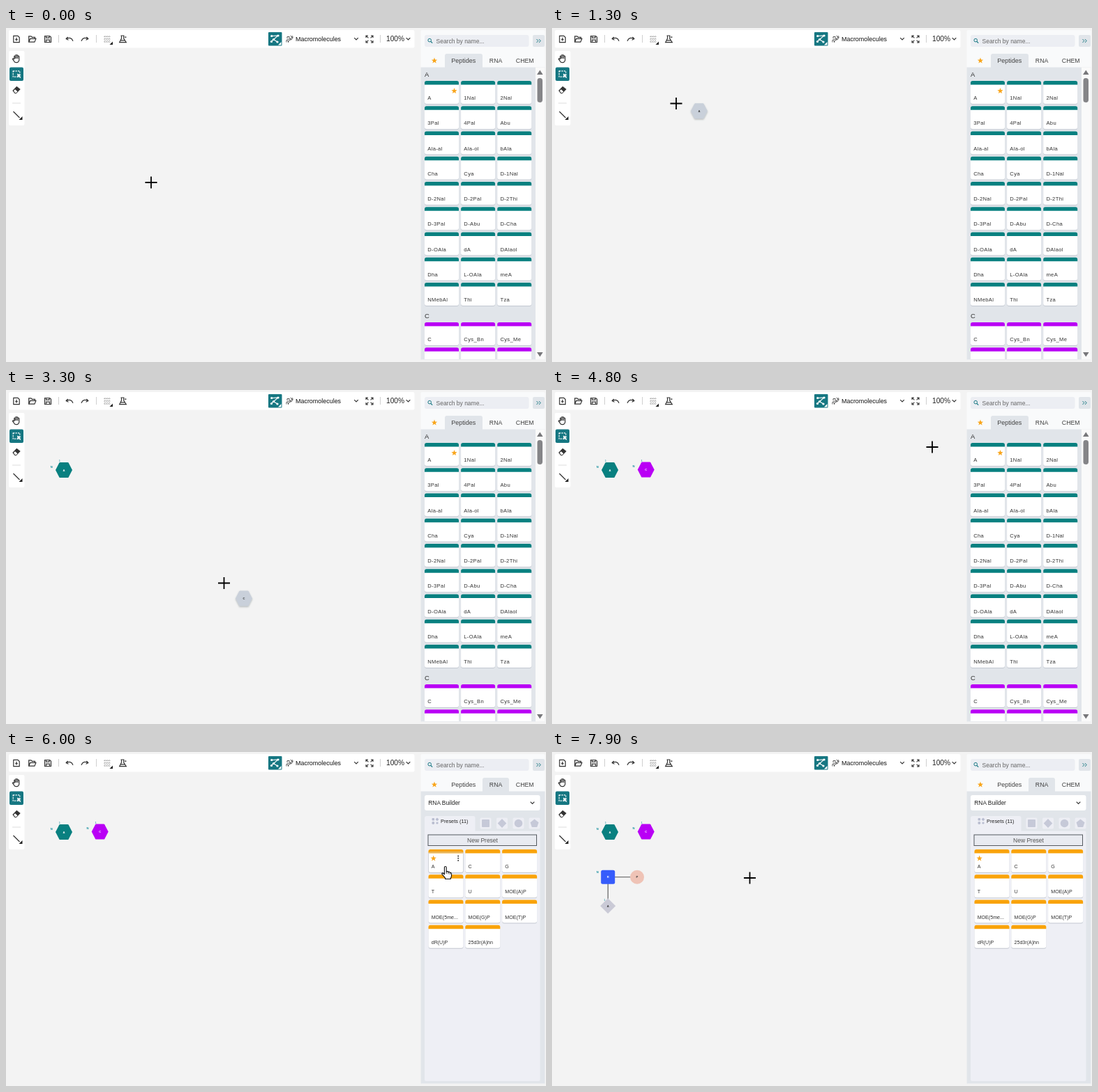
An HTML page that plays this animation: 774x480 px, repeating every 8 s.

```html
<!DOCTYPE html>
<html lang="en">
<head>
<meta charset="utf-8">
<title>Monomer editor</title>
<style>
html, body { margin: 0; width: 100%; height: 100%; overflow: hidden; background: #f3f3f3; }
svg { display: block; width: 774px; height: 480px; font-family: "Liberation Sans", Arial, sans-serif; }
.ico { fill: none; stroke: #333; stroke-width: 1.2; }
</style>
</head>
<body>
<svg id="stage" viewBox="0 0 774 480"></svg>
<script>
const LOOP = 8000, STEP = 100, LAG = 25;
const TEAL = '#167782', MARK = '#0b8b9a', GHOST = '#c9d0da', PANEL = '#e1e5ea';
const AMINO = '#088080', CYS = '#b900f5', PRESET = '#f9a30a';

const rect = (x, y, w, h, fill, r = 0, more = '') =>
  `<rect x="${x}" y="${y}" width="${w}" height="${h}" rx="${r}" fill="${fill}" ${more}/>`;
const text = (x, y, s, size = 8.8, fill = '#333', more = '') =>
  `<text x="${x}" y="${y}" font-size="${size}" fill="${fill}" ${more}>${s}</text>`;
const path = (d, more = '') => `<path d="${d}" ${more}/>`;
const icon = (x, y, d, more = '') => `<path class="ico" transform="translate(${x} ${y})" d="${d}" ${more}/>`;
const group = (id, body, more = '') => `<g id="${id}" ${more}>${body}</g>`;
const mid = 'text-anchor="middle"';

function star(x, y, r = 4.4) {
  let pts = '';
  for (let i = 0; i < 10; i++) {
    const a = i * Math.PI / 5, q = i % 2 ? r * 0.42 : r;
    pts += `${(x + q * Math.sin(a)).toFixed(2)},${(y - q * Math.cos(a)).toFixed(2)} `;
  }
  return `<polygon points="${pts}" fill="#f9a51a"/>`;
}

function card(x, y, w, label, color, size, gap) {
  return rect(x, y + 1, w, 33, '#c3c8d1', 3) + rect(x, y, w, 33, '#fff', 3) +
    path(`M${x} ${y + 5.6}v-2.8q0-2.8 2.8-2.8h${w - 5.6}q2.8 0 2.8 2.8v2.8z`, `fill="${color}"`) +
    text(x + 4.2, y + 27, label, size, '#333', `letter-spacing="${gap}"`);
}

function cards(names, x, y, dx, w, color, size, gap) {
  return names.split(' ').map((n, i) =>
    card(x + i % 3 * dx, y + Math.floor(i / 3) * 36.25, w, n, color, size, gap)).join('');
}

function topBar() {
  const sep = x => rect(x, 10, 1, 11, '#cfcfcf');
  return rect(4, 3, 581.5, 25.5, '#fff', 2) +
    icon(15, 16, 'M-4.2-4.6H2L4.2-2.4V4.6H-4.2zM0-2.2V2.5M-1.7 .7H1.7') +
    icon(37.5, 16, 'M-4.8 4.2V-4.2H-1.5L0-2.6H4V-.6M-4.8 4.2L-2.8-.6H5.4L3.4 4.2z') +
    icon(60, 16, 'M-4.5-4.5H2.8L4.5-2.8V4.5H-4.5zM-2.5-4.2V-1.8H2V-4.2M-2.5 4.4V1.2H2.5V4.4') +
    sep(75) +
    icon(91, 16, 'M-2.4-3.2L-4.8-.4L-1.5 1.2M-4.4-.4Q2.5-4 5 2.8') +
    icon(113, 16, 'M2.4-3.2L4.8-.4L1.5 1.2M4.4-.4Q-2.5-4-5 2.8') +
    sep(129) +
    icon(145, 16, 'M-4.8-3.6H4.8M-4.8 0H4.8M-4.8 3.8H4.8M-3-5V5M0-5V5M3-5V5',
      'style="stroke:#aaa;stroke-width:1" stroke-dasharray="2 1"') +
    path('M153 19.5v4.5h-4.5z', 'fill="#222"') +
    icon(167.5, 16, 'M-3-5H2M-2-5V-1L-4.8 4.6H4.8L1.2-1V-5M-3 1.8H3M2.5-2.8H5') +
    rect(376, 6, 19.5, 19.5, TEAL, 1) +
    icon(385.5, 15.5, 'M-4.5-4L4.5-4.5L-2 1L3.5 4.5M-5 3.5L-2 1',
      'style="stroke:#fff;stroke-width:1.1"') +
    [[-4.7, -4], [4.5, -4.5], [-2, 1], [3.5, 4.5], [-5, 4]].map(([x, y]) =>
      `<circle cx="${385.5 + x}" cy="${15.5 + y}" r="1.6" fill="#fff"/>`).join('') +
    path('M394.5 20v4.5h-4.5z', 'fill="#fff"') +
    icon(406.5, 16, 'M-4.5 4.5Q-5.5 0-1 0T3.8-5M-2 5Q-2 1 1 1T4.8-3.5M-4 1L-1.5 4M-1-3L2 1M1-5L4.5-2M-3.5-1V-3.5H0',
      'style="stroke-width:.8"') +
    text(415, 18.6, 'Macromolecules', 8.95, '#111') +
    icon(502, 15.5, 'M-2.8-1.4L0 1.4L2.8-1.4') +
    icon(521, 16, 'M-5-2V-5H-2M2-5H5V-2M5 2V5H2M-2 5H-5V2M-4.6-4.6L-1.6-1.6M4.6-4.6L1.6-1.6M4.6 4.6L1.6 1.6M-4.6 4.6L-1.6 1.6',
      'style="stroke-width:1.1"') +
    sep(536) + text(545, 19, '100%', 10.2, '#222') +
    icon(576.5, 15.5, 'M-2.8-1.4L0 1.4L2.8-1.4');
}

function sideBar() {
  return rect(4, 33, 22.5, 107, '#fff', 2) +
    icon(15, 44, 'M-3.2 1V-3.4Q-2.6-4.6-1.8-3.4V0M-1.8-4.4Q-1-6 0-4.6V0M0-4.8Q1.2-6 1.9-4.3V0M1.9-3.5Q3.2-4.6 3.8-3V2Q3.4 5.6 0 5.6Q-2.6 5.6-3.6 3.4L-5.6 .6Q-5-1-3.2 1') +
    rect(5, 56.5, 20, 19.5, TEAL, 2) +
    icon(15, 66, 'M-4.8-4.2H4.8V4.2H-4.8z', 'style="stroke:#fff" stroke-dasharray="2.2 1.2"') +
    path('M16 65.5l5.5 2.2-2.2 1 2 2.3-1 .9-2-2.3-1.3 2z', 'fill="#fff"') +
    path('M9.3 90l6-6.2 5.4 4.2-6 6.2h-2z', 'fill="#333"') +
    path('M11 90.3l2-2 3.4 3-1.9 1.9h-1.3z', 'fill="#fff"') +
    rect(9, 107.5, 12, 1, '#dedede') +
    icon(15, 124.5, 'M-4.5-4.5L4.5 4.5') +
    path('M23.5 127v5h-5z', 'fill="#222"');
}

function panelHead() {
  return rect(594.5, 3, 178, 473.5, '#f9fafb', 2) +
    rect(600, 10, 149.5, 17, '#eceef3', 3) +
    '<circle class="ico" cx="607.2" cy="17.6" r="2.3" style="stroke:#167782;stroke-width:1"/>' +
    path('M609 19.5l2.2 2.2', 'stroke="#167782" stroke-width="1.2"') +
    text(616.5, 21.8, 'Search by name...', 8.5, '#666') +
    rect(755, 10, 17, 17, PANEL, 2) +
    icon(763.5, 18.5, 'M-3-2.4L-.6 0L-3 2.4M.4-2.4L2.8 0L.4 2.4', 'style="stroke:#167782;stroke-width:1"');
}

const tab = (x, w) => path(`M${x} 57V40q0-3 3-3h${w - 6}q3 0 3 3v17z`, `fill="${PANEL}"`);
const tabNames = star(614, 47) + text(638.3, 49.8, 'Peptides', 9, '#444') +
  text(692.8, 49.8, 'RNA', 8.8, '#444') + text(730.8, 49.8, 'CHEM', 8.8, '#444');

function peptides() {
  const list = 'A 1Nal 2Nal 3Pal 4Pal Abu Ala-al Ala-ol bAla Cha Cya D-1Nal D-2Nal D-2Pal D-2Thi ' +
    'D-3Pal D-Abu D-Cha D-OAla dA DAlaol Dha L-OAla meA NMebAl Thi Tza';
  return rect(594.5, 56.5, 178, 420, PANEL) + tab(629, 54) + tabNames +
    text(600, 70.3, 'A', 9.4) + text(600, 417, 'C', 9.4) +
    cards(list, 600, 76, 52.1, 49, AMINO, 7.6, 0.35) + star(642.5, 90.5) +
    group('cys', cards('C Cys_Bn Cys_Me D-C dC meC', 600, 423, 52.1, 49, CYS, 7.6, 0.35), 'clip-path="url(#fold)"') +
    rect(759, 56.5, 13.5, 420, '#fafafa') +
    rect(761.5, 72, 7.5, 35, '#858588', 3.7) +
    path('M761 67l4.3-6.5 4.3 6.5zM761 466l4.3 6.5 4.3-6.5z', 'fill="#77777a"');
}

function rna() {
  const box = x => rect(x, 94.5, 16, 16, '#edeef4', 2);
  const dim = 'fill="#c6c9d8"';
  return rect(594.5, 56.5, 178, 420, PANEL) + tab(683, 38) + tabNames +
    rect(600, 62, 165.5, 22, '#fff', 3) + text(605.3, 76, 'RNA Builder', 8.4, '#222') +
    icon(754.5, 73, 'M-2.8-1.4L0 1.4L2.8-1.4') +
    rect(600, 92, 72.5, 25, '#eeeff5', 3) + rect(600, 113.5, 165.5, 359.5, '#eeeff5', 2) +
    rect(610.5, 95, 3.6, 3.6, '#b9bdd0', 1) + path('M618 94.4l2.4 2.4-2.4 2.4-2.4-2.4z', 'fill="#b9bdd0"') +
    '<circle cx="612.3" cy="102" r="2" fill="#b9bdd0"/><circle cx="618" cy="102" r="1.6" fill="#b9bdd0"/>' +
    text(623, 102, 'Presets (11)', 7.35, '#222') +
    [679.5, 703, 726.5, 749.5].map(box).join('') +
    rect(682, 97, 11, 11, '#c6c9d8', 1) +
    path('M711 96l6.3 6.5-6.3 6.5-6.3-6.5z', dim) +
    `<circle cx="734.5" cy="102.5" r="5.8" ${dim}/>` +
    path('M757.5 96.6l6 4.6-2.3 6.8h-7.4l-2.3-6.8z', dim) +
    rect(605, 119, 155.5, 15.5, '#e9ebf1', 0, 'stroke="#555a60"') +
    text(683, 129.8, 'New Preset', 8.5, '#555', mid) +
    cards('A C G T U MOE(A)P MOE(5me... MOE(G)P MOE(T)P dR(U)P 25d3r(A)hn', 605.5, 140, 52.8, 50, PRESET, 7.1, 0) +
    star(612.7, 153) +
    group('dots', rect(605.5, 144, 50, 30, 'none', 3, 'stroke="#c9cdd5" stroke-width=".8"') +
      [-3.2, 0, 3.2].map(d => `<circle cx="648.2" cy="${152.8 + d}" r="1.05" fill="#444"/>`).join(''));
}

const tag = (x, y, s, fill) => text(x, y + 1.5, s, 4.2, fill, mid + ' font-weight="bold"');

// Monomer shapes are centred on 0,0
const hexagon = (fill, s, ink) =>
  path('M-12 0L-6.6-10.4Q-6.2-11-5.5-11H5.5Q6.2-11 6.6-10.4L12 0L6.6 10.4Q6.2 11 5.5 11H-5.5Q-6.2 11-6.6 10.4z',
    `fill="${fill}"`) + tag(0, 0, s, ink);

function nucleotide(sugar, phosphate, base, line, width, ink) {
  return path('M0 0H41.5M0 0V41.5', `fill="none" stroke="${line}" stroke-width="${width}"`) +
    rect(-10, -10, 20, 20, sugar, 2.5) + tag(0, 0, 'R', ink) +
    `<circle cx="41.8" cy="0" r="10" fill="${phosphate}"/>` + tag(41.8, 0, 'P', '#333') +
    path('M0 30.5L11 41.5L0 52.5L-11 41.5z', `fill="${base}" stroke-linejoin="round"`) + tag(0, 41.5, 'A', '#333');
}

const ends = tag(-17.7, -5, 'N', MARK) + text(-7.2, -11.6, '1', 4, MARK);
const at = (x, y) => `transform="translate(${x} ${y})"`;
const soft = 'filter="url(#shade)"';

const hand = 'M-1.6 9V1.4a1.4 1.4 0 0 1 2.8 0V7.5q2.6-1 2.8 .6 2.2-.6 2.5 .8 2-.3 2 1.4v3q0 2-1.2 3.5V18H-.5v-1.6L-4.8 11.4q-1-1.8 .6-2 1 0 2.6 2z';

const stage = document.getElementById('stage');
stage.innerHTML =
  '<defs><clipPath id="fold"><path d="M594 400H773V476H594z"/></clipPath>' +
  '<filter id="shade" x="-40%" y="-40%" width="180%" height="180%">' +
  '<feDropShadow dx="0" dy="1.2" stdDeviation="1" flood-color="#566" flood-opacity=".45"/></filter></defs>' +
  rect(0, 0, 774, 480, '#f3f3f3') + topBar() + sideBar() + panelHead() +
  group('peptides', peptides()) + group('rna', rna()) +
  group('putA', hexagon(AMINO, 'A', '#fff') + ends, at(83, 115)) +
  group('putC', hexagon(CYS, 'C', '#fff') + ends, at(134.7, 114.6)) +
  group('putR', nucleotide('#365cfb', '#efc3b6', '#cacad6', '#555', 1.1, '#fff') +
    tag(-15, -7.5, 'N', MARK) + text(-6, 34, '1', 4, MARK), at(80.2, 179.7)) +
  group('dragA', hexagon(GHOST, 'A', '#333'), soft) +
  group('dragC', hexagon(GHOST, 'C', '#333'), soft) +
  group('dragR', nucleotide(GHOST, GHOST, GHOST, GHOST, 3, '#333'), soft) +
  group('cross', path('M-8.5 0H8.5M0-8.5V8.5', 'stroke="#000" stroke-width="1.8"')) +
  group('hand', path(hand, 'fill="#fff" stroke="#111" stroke-width="1.1" stroke-linejoin="round"') +
    path('M1.2 7.5V10.5M4 8.4V11M6.5 9.2V11.4', 'stroke="#111" stroke-width=".8"'));

const el = id => document.getElementById(id);
const show = (id, on) => { el(id).style.display = on ? '' : 'none'; };
const move = (id, x, y) => el(id).setAttribute('transform', `translate(${x.toFixed(1)} ${y.toFixed(1)})`);

// Pointer stops: time, x, y
const stops = [
  [0, 208, 222], [100, 208, 222], [800, 625, 96], [1000, 625, 96], [1300, 178, 108.5], [1600, 71, 104],
  [2000, 71, 104], [2700, 625, 440], [2900, 625, 440], [3300, 312.5, 277.5], [3700, 123, 104],
  [4300, 123, 104], [4800, 545, 82], [5200, 702, 46], [5400, 702, 46], [5900, 630, 164.5],
  [6200, 630, 164.5], [6700, 86.5, 189.5], [7000, 70.5, 169.5], [7700, 70.5, 169.5], [7900, 283.5, 181], [8000, 283.5, 181]
];

const slope = (i, k) => stops[i + 1] && stops[i]
  ? (stops[i + 1][k] - stops[i][k]) / (stops[i + 1][0] - stops[i][0]) : 0;
const tangent = (i, k) => {
  const a = slope(i - 1, k), b = slope(i, k);
  return a * b > 0 ? 2 * a * b / (a + b) : 0;
};

// Monotone cubic through the stops, so holds stay still
function pointer(t) {
  let i = 0;
  while (i < stops.length - 2 && t >= stops[i + 1][0]) i++;
  const h = stops[i + 1][0] - stops[i][0], u = Math.max(0, (t - stops[i][0]) / h);
  const v = 1 - u;
  return [1, 2].map(k =>
    stops[i][k] * (1 + 2 * u) * v * v + stops[i + 1][k] * u * u * (3 - 2 * u) +
    h * u * v * (tangent(i, k) * v - tangent(i + 1, k) * u));
}

const drags = { A: [1000, 1700], C: [2900, 3900], R: [6200, 7100] };

function draw(t) {
  const [x, y] = pointer(t), [gx, gy] = pointer(t - LAG);
  const builder = t >= 5300, over = x > 594;
  show('peptides', !builder);
  show('rna', builder);
  show('dots', builder && over && x < 656 && y > 140 && y < 174);
  for (const k in drags) {
    const [from, to] = drags[k];
    show('put' + k, t >= to);
    show('drag' + k, t > from && t < to && gx < 582);
    move('drag' + k, gx + 12, gy + 11);
  }
  show('hand', over);
  show('cross', !over);
  move('hand', x, y);
  move('cross', x, y);
}

const start = performance.now();
function tick() {
  const t = (performance.now() - start) % LOOP;
  draw(Math.floor(t / STEP) * STEP);
  requestAnimationFrame(tick);
}
tick();
</script>
</body>
</html>
```
